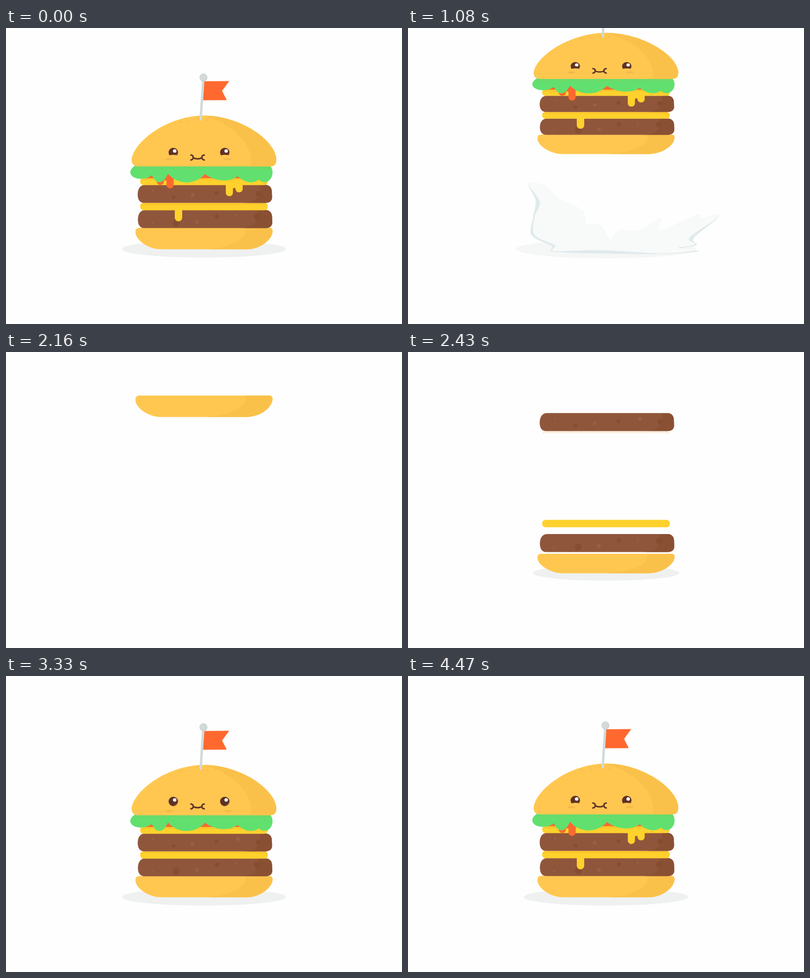
Animation of 800x600 px, one loop 4500 ms. Source, as an HTML page:

```html
<!DOCTYPE html>
<html lang="en">
<head>
<meta charset="utf-8">
<title>Burger</title>
<style>
  html, body { margin: 0; width: 100%; height: 100%; overflow: hidden; background: #fefefe; }
  svg { display: block; width: 800px; height: 600px; }
  .bun { fill: #ffc750; }
  .bunShade { fill: #fac14a; }
  .seed, .blush { fill: #f4b94a; }
  .meat { fill: #90563b; }
  .meatShade { fill: #8a5033; }
  .dark { fill: #874d32; }
  .light { fill: #976046; }
  .cheese { fill: #ffd12d; }
  .red { fill: #ff692f; }
  .green { fill: #61e06f; }
  .cast { fill: #e88a10; opacity: .14; }
  .eye { fill: #5f3324; }
  .mouth { fill: none; stroke: #5f3324; stroke-width: 3; stroke-linecap: round; }
</style>
</head>
<body>
<svg viewBox="0 0 800 600">
  <defs>
    <path id="baseShape" d="M269 405H532Q538.5 405 538.5 412C538 430 512 448.5 487 448.5H313C288 448.5 261 430 261.5 413Q262 405 269 405Z"/>
    <path id="meatShape" d="M281 369H524C533 369 537.5 375 537.5 383L538 394C538 401 533 405.5 525 405.5H279C270 405.5 266 397 266.5 387C267 375 273 369 281 369Z"/>
    <path id="topShape" d="M267 280.5C256 280.5 253 273 254 264C262 226 330 177.5 400 177.5C470 177.5 541 224 546 264C547 274 543 280.5 534 280.5Z"/>
    <path id="castShape" d="M271 362Q271 354.5 278 354.5H522Q529 354.5 529 362Q528 358.5 522 358.5H278Q272 358.5 271 362Z"/>
    <clipPath id="inBase"><use href="#baseShape"/></clipPath>
    <clipPath id="inMeat"><use href="#meatShape"/></clipPath>
    <clipPath id="inTop"><use href="#topShape"/></clipPath>
  </defs>

  <ellipse id="shadow" cx="400" cy="448" fill="#eff1f1"/>

  <g id="body">
    <g id="base">
      <use href="#baseShape" class="bun"/>
      <path class="bunShade" clip-path="url(#inBase)" d="M482 404C490 428 455 445 402 449H545V404Z"/>
    </g>
    <g id="meat1"></g>
    <g id="cheese1">
      <rect class="cheese" x="271" y="354.5" width="258" height="15" rx="7"/>
      <path id="dripLow" class="cheese"/>
    </g>
    <g id="meat2"></g>
    <g id="cheese2">
      <rect class="cheese" x="271" y="304" width="258" height="14.5" rx="7"/>
      <path id="dripMid" class="cheese"/>
    </g>
    <g id="tomato">
      <use href="#castShape" class="cast" y="-50"/>
      <rect class="red" x="266" y="289.5" width="268.5" height="15" rx="7.3"/>
      <path id="dripRed" class="red"/>
    </g>
    <g id="lettuce" class="green">
      <ellipse cx="276" cy="290" rx="25" ry="15.5" transform="rotate(-9 276 290)"/>
      <path id="lobes"/>
      <ellipse cx="522" cy="293" rx="16.5" ry="19.5"/>
    </g>
    <g id="top">
      <rect x="258" y="279" width="280" height="8" rx="4" fill="#e88a10" opacity=".04"/>
      <use href="#topShape" class="bun"/>
      <path class="bunShade" clip-path="url(#inTop)" d="M396 176C455 192 504 237 494 282H550V176Z"/>
      <g id="seeds" class="seed"></g>
      <g id="eyes"></g>
      <path class="mouth" d="M373.5 257.5Q378.5 258 378.2 262.5Q378 267 373.5 267.5M378 262.8Q387 267.5 396 262.8M400.5 257.5Q395.5 258 395.8 262.5Q396 267 400.5 267.5"/>
    </g>
    <g id="flag">
      <path class="red" d="M400 108L451 107.5L436.5 127.5L446 146.3L397 146.5Z"/>
      <path d="M398.7 102L393.3 185" stroke="#d3dad9" stroke-width="5" stroke-linecap="round"/>
      <circle cx="398.8" cy="100.3" r="8" fill="#c8d0cf"/>
      <circle cx="398" cy="99.8" r="7" fill="#d3dad9"/>
    </g>
  </g>

  <g id="smoke">
    <path id="smokeDark" fill="#e0eaec"/>
    <path id="smokeLight" fill="#f8fafa"/>
  </g>
  <g id="hole" fill="#fefefe">
    <ellipse rx=".85" ry="1"/>
    <ellipse cx="-.5" cy="-.3" rx=".5" ry=".7"/>
    <ellipse cx=".5" cy="-.25" rx=".5" ry=".75"/>
  </g>
</svg>

<script>
const LOOP = 4500, GROUND = 448, FALL = 300, HEIGHT = 450, STEP = 69, LEAP = 975;
const el = id => document.getElementById(id);
const set = (id, attrs) => { for (const k in attrs) el(id).setAttribute(k, attrs[k]); };

const eases = {
  in: p => p * p,
  out: p => 1 - (1 - p) * (1 - p),
  both: p => p * p * (3 - 2 * p)
};

// Eased change from one value to another between two times.
function ramp(t, t0, t1, from, to, ease = 'both') {
  const p = Math.min(1, Math.max(0, (t - t0) / (t1 - t0)));
  return from + (to - from) * eases[ease](p);
}

const pulse = (age, length) => age > 0 && age < length ? Math.sin(Math.PI * age / length) : 0;
const rise = (age, tau) => age > 0 ? 1 - Math.exp(-age / tau) : 0;
const squash = (s, y = 0) => `translate(0 ${y + GROUND * (1 - s)}) scale(1 ${s})`;

function seeded(seed) {
  return () => (seed = seed * 16807 % 2147483647) / 2147483647;
}

function patty(seed, edge) {
  const rnd = seeded(seed);
  let spots = '';
  for (let i = 0; i < 6; i++) {
    const dark = i % 2, r = dark ? 3 + 5 * rnd() : 2 + 2 * rnd();
    spots += `<circle class="${dark ? 'dark' : 'light'}" cx="${290 + 42 * i + 14 * rnd()}" cy="${376 + 20 * rnd()}" r="${r}"/>`;
  }
  return `<use href="#meatShape" class="meat"/>
    <g clip-path="url(#inMeat)">
      <path class="meatShade" d="M${edge} 368q5 20 -10 32q-8 5 -24 6H545V368Z"/>${spots}
    </g>`;
}
el('meat1').innerHTML = patty(41, 508);
el('meat2').innerHTML = `<use href="#castShape" class="cast"/>
  <g transform="translate(-.4 -51)">${patty(977, 513)}</g>`;

// Leaf folds: x, top, bottom, then the bulge up and down towards the next fold.
const folds = [
  [294, 273, 297, 7, 22], [327, 273, 295.5, 17, 23], [402, 275.5, 296, 6, 14],
  [468, 273.5, 300.5, 9, 12], [512, 274, 306]
];
const bulge = ([x0, y0], [x1, y1], b) =>
  `C${x0 + (x1 - x0) * .28} ${y0 + b} ${x0 + (x1 - x0) * .72} ${y1 + b} ${x1} ${y1}`;
set('lobes', {
  d: folds.slice(1).map(([x1, top1, low1], i) => {
    const [x0, top0, low0, up, down] = folds[i];
    return `M${x0} ${top0}${bulge([x0, top0], [x1, top1], -up)}V${low1}${bulge([x1, low1], [x0, low0], down)}Z`;
  }).join('')
});

for (let i = 0; i < 6; i++) {
  const x = 352 + 18 * i;
  el('seeds').innerHTML += `<ellipse cx="${x}" cy="${184 + (x - 398) ** 2 / 330 + 3 * (i % 2)}" rx="2.5" ry="1.1"/>`;
}

el('eyes').innerHTML = [[338, 330], [442, 448]].map(([x, blush]) => `
  <circle class="eye" cx="${x}" cy="252.3" r="9.5"/>
  <path d="M${x + 9} 253q-1 7 -8 8.5q5 -4.500 8 -8.500Z" fill="#8a5340"/>
  <circle cx="${x + 2.8}" cy="249.3" r="3.5" fill="#fff"/>
  <g class="cheek">
    <ellipse class="bun" cx="${x}" cy="265.5" rx="14" ry="8.5"/>
    <ellipse class="blush" cx="${blush}" cy="265.8" rx="8" ry="2.4"/>
  </g>`).join('');
const cheeks = document.querySelectorAll('.cheek');

// Closed smooth curve through a list of points.
function smooth(pts) {
  const at = i => pts[(i + pts.length) % pts.length];
  return 'M' + pts[0] + pts.map((p, i) => {
    const a = at(i - 1), q = at(i + 1), b = at(i + 2);
    const c1 = [0, 1].map(k => p[k] + (q[k] - a[k]) / 6);
    const c2 = [0, 1].map(k => q[k] - (b[k] - p[k]) / 6);
    return `C${c1} ${c2} ${q}`;
  }).join('') + 'Z';
}

const points = text => text.split(' ').map(p => p.split(',').map(Number));
const crest = points('243,315 276,320 308,348 352,370 361,397 388,400 409,427 426,410 468,410 511,385 509,411 584,379 592,386 623,378');
const rim = points('624,387 577,426 583,440 551,447 587,453 515,458 380,457 294,453 290,442 250,420 253,383 258,350');

// The lit side is the rim drawn in by a varying amount.
const lit = rim.map(([x, y], i) => {
  const dx = 432 - x, dy = 400 - y, k = (2 + 7 * Math.sin(i * 1.3) ** 2) / Math.hypot(dx, dy);
  return [x + dx * k, y + dy * k];
});
set('smokeDark', { d: smooth([...crest, ...rim]) });
set('smokeLight', { d: smooth([...crest, ...lit]) });

// Rounded drop hanging from y down to end.
function drop(x, y, end, w = 14.5) {
  const r = w / 2, b = Math.max(y, end - r);
  const h = Math.max(0, Math.min(r, end - y));
  return h ? `M${x} ${y - 3}V${b}A${r} ${h} 0 0 0 ${x + w} ${b}V${y - 3}Z` : '';
}

// Two drops joined by a small arch.
function twin(x, y, endA, endB, web) {
  const w = 14.5, gap = 5.2, x2 = x + w + gap;
  const arch = web > y
    ? `M${x + w - 1} ${y - 2}V${web}H${x + w}A${gap / 2} ${gap / 2} 0 0 1 ${x2} ${web}H${x2 + 1}V${y - 2}Z` : '';
  return drop(x, y, endA) + drop(x2, y, endB) + arch;
}

// Two runs of falling layers, each piece one step behind the last.
const run = (ids, start) => ids.map((id, i) => ({ id, start: start + STEP * i, land: start + STEP * i + FALL }));
const layers = [
  ...run(['base', 'meat1', 'cheese1', 'meat2', 'cheese2'], 1996.8),
  ...run(['tomato', 'lettuce', 'top', 'flag'], 2585.5)
];
const [, firstMeat, , ...upper] = layers;

function leave(t) {
  const age = Math.max(0, t - LEAP);
  const s = t < 960 ? ramp(t, 810, 960, 1, .8) : ramp(t, 960, 1190, .8, 1);
  set('body', { transform: squash(s, -193 * (age / 105) ** 2) });
  const size = 166 + 16 * age / 105;
  set('shadow', { rx: size, ry: size * .105, opacity: ramp(t, LEAP, 1195, 1, 0) });
  for (const { id } of layers) set(id, { transform: '' });
}

function build(t) {
  const knocks = upper.reduce((sum, { land }) => sum + pulse(t - land, 200), 0);
  const rest = 1 - ramp(t, 2500, 2560, 0, .01) + ramp(t, 3600, 4100, 0, .01);
  set('body', { transform: squash(rest - .012 * knocks - .012 * pulse(t - 3600, 400)) });
  for (const { id, start, land } of layers) {
    const s = id === 'base' ? 1 - .11 * pulse(t - firstMeat.land, 200) : 1;
    set(id, { transform: squash(s, ramp(t, start, land, -HEIGHT, 0, 'in')) });
  }
  const size = ramp(t, 2190, 2400, 0, 147, 'out') + ramp(t, 2400, 3200, 0, 19, 'out');
  set('shadow', { rx: size, ry: size * .105, opacity: 1 });
}

function drips(u) {
  const grow = (from, to, start, end = LOOP, ease = 'out') => ramp(u, start, end, from, to, ease);
  set('dripLow', { d: drop(341, 369, grow(366, 392, 3750), 15) });
  set('dripMid', { d: twin(444, 318, grow(315, 342.5, 3700, 4740), grow(315, 333.3, 3800), grow(315, 326.5, 3750)) });
  set('dripRed', { d: twin(304.5, 304, grow(300, 318.3, 3800), grow(300, 329, 3700, 4740, 'both'), grow(300, 311, 3750)) });
}

function smoke(t) {
  const age = t - LEAP;
  const cx = 400 + 32 * Math.exp(-Math.abs(age - 105) / 100);
  set('smoke', {
    transform: `translate(${cx} 458) scale(${1.25 * rise(age, 65)} ${1.7 * rise(age, 118)}) translate(-432 -458)`,
    opacity: age > 0 ? ramp(t, 1500, 1670, 1, 0) : 0
  });
  const eaten = ramp(t, 1190, 1680, 0, 310);
  set('hole', {
    transform: `translate(400 462) scale(${eaten} ${eaten * .85})`,
    visibility: eaten > 0 && t < 1680 ? 'visible' : 'hidden'
  });
}

function draw(t) {
  const built = t < 1800;
  built ? leave(t) : build(t);
  drips(built ? t + LOOP : t);
  smoke(t);
  const up = built ? 1 : ramp(t, 3900, 4230, 0, 1);
  cheeks.forEach(c => {
    c.setAttribute('transform', `translate(0 ${6.5 * (1 - up)})`);
    c.firstElementChild.setAttribute('opacity', up > 0 ? 1 : 0);
  });
}

let begin;
function frame(now) {
  begin ??= now;
  draw((now - begin) % LOOP);
  requestAnimationFrame(frame);
}
draw(0);
requestAnimationFrame(frame);
</script>
</body>
</html>
```
